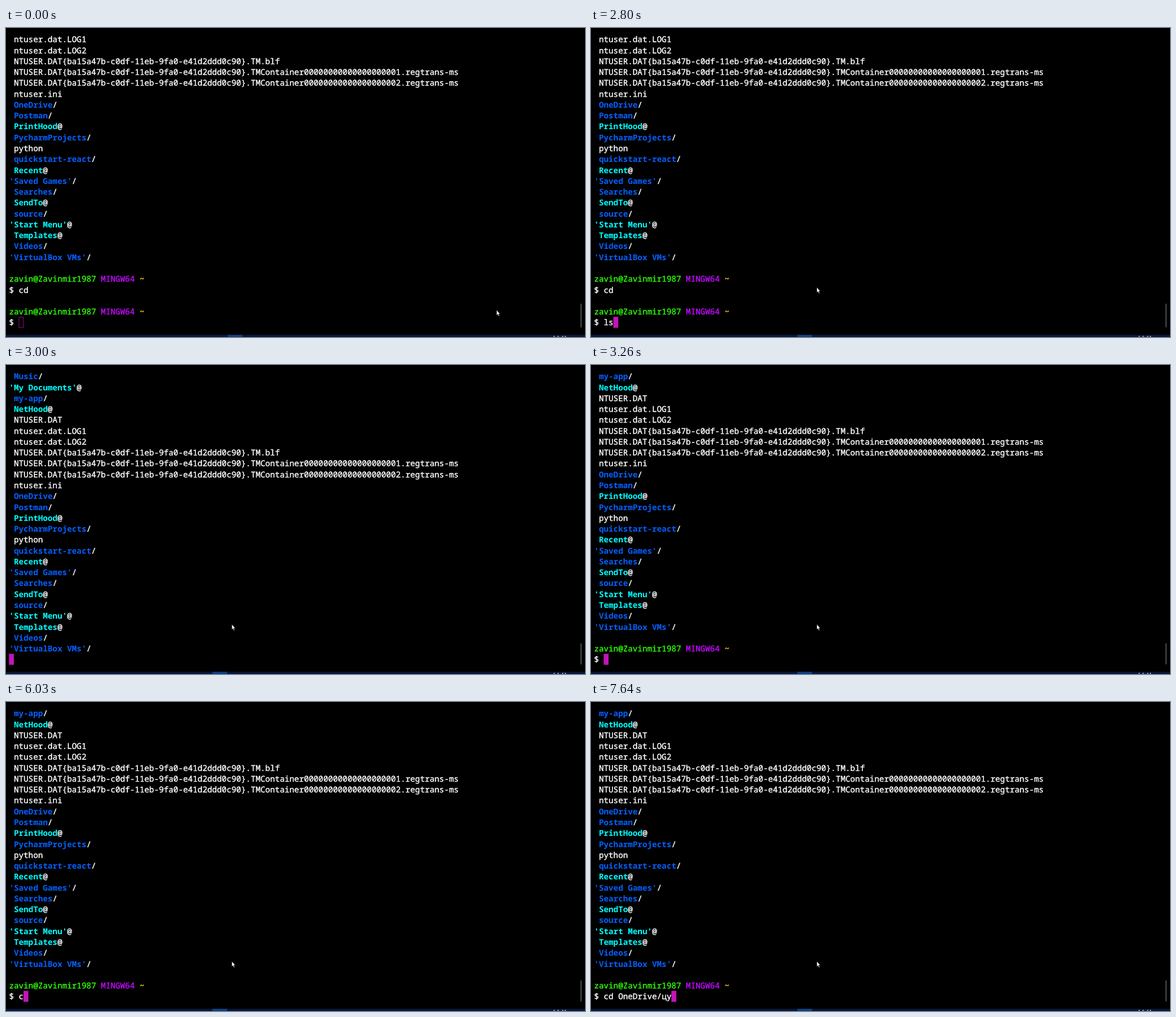
An HTML page for the animation above (8000 ms loop, 1024 by 547 pixels).

```html
<!DOCTYPE html>
<html lang="en">
<head>
<meta charset="utf-8">
<title>Terminal session</title>
<style>
  html, body { margin: 0; width: 100%; height: 100%; overflow: hidden; background: #000; }
  svg { display: block; width: 100vw; height: 100vh; }
  text { white-space: pre; text-rendering: geometricPrecision; }
  #rows { font: 14.26px "Noto Sans Mono", "DejaVu Sans Mono", monospace; color: #fff; }
  #rows text, #rows tspan { fill: currentColor; stroke: currentColor; stroke-width: .4px; }
  #rows .dir, #rows .link { font-weight: 700; stroke-width: 0; }
  #rows .dir { color: #0560ff; }
  #rows .link { color: #0ff; }
  #rows .user { color: #30ff08; }
  #rows .system { color: #c40cff; }
  #rows .path { color: #f8cc10; }
  #clock { font: 10px "Open Sans", sans-serif; fill: #e4e8f0; }
</style>
</head>
<body>
<svg viewBox="0 0 1024 547" preserveAspectRatio="none">
  <rect width="1024" height="547" fill="#000"/>
  <g id="rows"></g>
  <rect id="caret"/>
  <rect id="thumb" x="1016" width="2" fill="#4c4c4c"/>
  <rect y="543" width="1024" height="4" fill="#06173a"/>
  <rect id="task" y="543" width="26" height="4" fill="#0d3f80"/>
  <text id="clock" x="967" y="552.3">14:41</text>
  <circle id="click" cx="355.5" cy="457.7" r="6.5" fill="#827c00"/>
  <path id="pointer" d="M0 0V9.2L2 7.4L3.6 11L5 10.4L3.5 7H6Z" fill="#fff" stroke="#000" stroke-width=".5"/>
</svg>
<script>
const LOOP = 8000;
const COL = 8.556, LEFT = 5.4, ROW = 19.27, BASELINE = 25.3;
const $ = id => document.getElementById(id);

const regFile = "NTUSER.DAT{ba15a47b-c0df-11eb-9fa0-e41d2ddd0c90}.TM";
const container = n => `${regFile}Container${String(n).padStart(20, "0")}.regtrans-ms`;
const listing = [
  "Music/", "'My Documents'@", "my-app/", "NetHood@", "NTUSER.DAT",
  "ntuser.dat.LOG1", "ntuser.dat.LOG2", regFile + ".blf", container(1), container(2),
  "ntuser.ini", "OneDrive/", "Postman/", "PrintHood@", "PycharmProjects/", "python",
  "quickstart-react/", "Recent@", "'Saved Games'/", "Searches/", "SendTo@", "source/",
  "'Start Menu'@", "Templates@", "Videos/", "'VirtualBox VMs'/"
];

const span = (kind, text) => `<tspan class="${kind}">${text}</tspan>`;
const prompt = span("user", "zavin@Zavinmir1987") + " " + span("system", "MINGW64") + " " + span("path", "~");

function entry(name) {
  const kind = { "/": "dir", "@": "link" }[name.slice(-1)];
  const label = kind ? span(kind, name.slice(0, -1)) + name.slice(-1) : name;
  return name[0] === "'" ? label : " " + label;
}

const files = listing.map(entry);
const history = [...files, "", prompt, "$ cd", "", prompt];

// Each step: start time, text after the prompt
const typing = [
  [0, ""], [2670, "l"], [2800, "ls"], [3000, ""],
  [4780, "c"], [5040, "cd"], [6030, "c"], [6100, "cd"], [6170, "cd "],
  [6570, "cd O"], [6640, "cd On"], [6710, "cd One"], [6780, "cd OneDrive/"],
  [7570, "cd OneDrive/ц"], [7640, "cd OneDrive/цу"]
];

function screenAt(t) {
  const input = "$ " + typing.filter(([start]) => t >= start).pop()[1];
  if (t < 2930) return [...history, input];
  if (t < 3000) return [...history, input, ""];
  if (t < 3260) return [...files, ""];
  return [...files, "", prompt, input];
}

let shown = "";
function drawScreen(t) {
  const lines = screenAt(t).slice(-27);
  const markup = lines.map((line, i) =>
    `<text xml:space="preserve" x="${LEFT}" y="${(BASELINE + i * ROW).toFixed(2)}">${line}</text>`).join("");
  if (markup !== shown) $("rows").innerHTML = shown = markup;
  return lines[26].length;
}

function set(id, attrs) {
  for (const name in attrs) $(id).setAttribute(name, attrs[name]);
}

function progress(t, start, steps) {
  const k = Math.floor((t - start) / 70) + 1;
  const p = Math.min(1, Math.max(0, k / steps));
  return p * p * (3 - 2 * p);
}

function render(t) {
  const column = drawScreen(t);
  const focused = t >= 1670;
  const inset = focused ? 0 : 0.5;
  set("caret", {
    x: LEFT - 0.1 + column * COL + inset, y: 511.3 + inset,
    width: 8.6 - 2 * inset, height: 19.4 - 2 * inset,
    fill: focused ? "#c414b8" : "none", stroke: focused ? "none" : "#8c0e84"
  });

  const top = t < 3000 ? 488 : 493;
  set("thumb", { y: top, height: 530 - top });
  set("task", { x: focused ? 365 : 392, opacity: t >= 1670 && t < 1740 ? 0 : 1 });
  set("click", { opacity: t >= 1670 && t < 1870 ? (t < 1740 ? 1 : 0.6) : 0 });

  const a = progress(t, 990, 5), b = progress(t, 1870, 4);
  const x = 867.7 - 512 * a + 43.7 * b;
  const y = 499.3 - 41.6 * a + 1.3 * b;
  set("pointer", { transform: `translate(${x.toFixed(2)} ${y.toFixed(2)})` });
}

const began = performance.now();
function tick() {
  render((performance.now() - began) % LOOP);
  requestAnimationFrame(tick);
}
tick();
</script>
</body>
</html>
```
